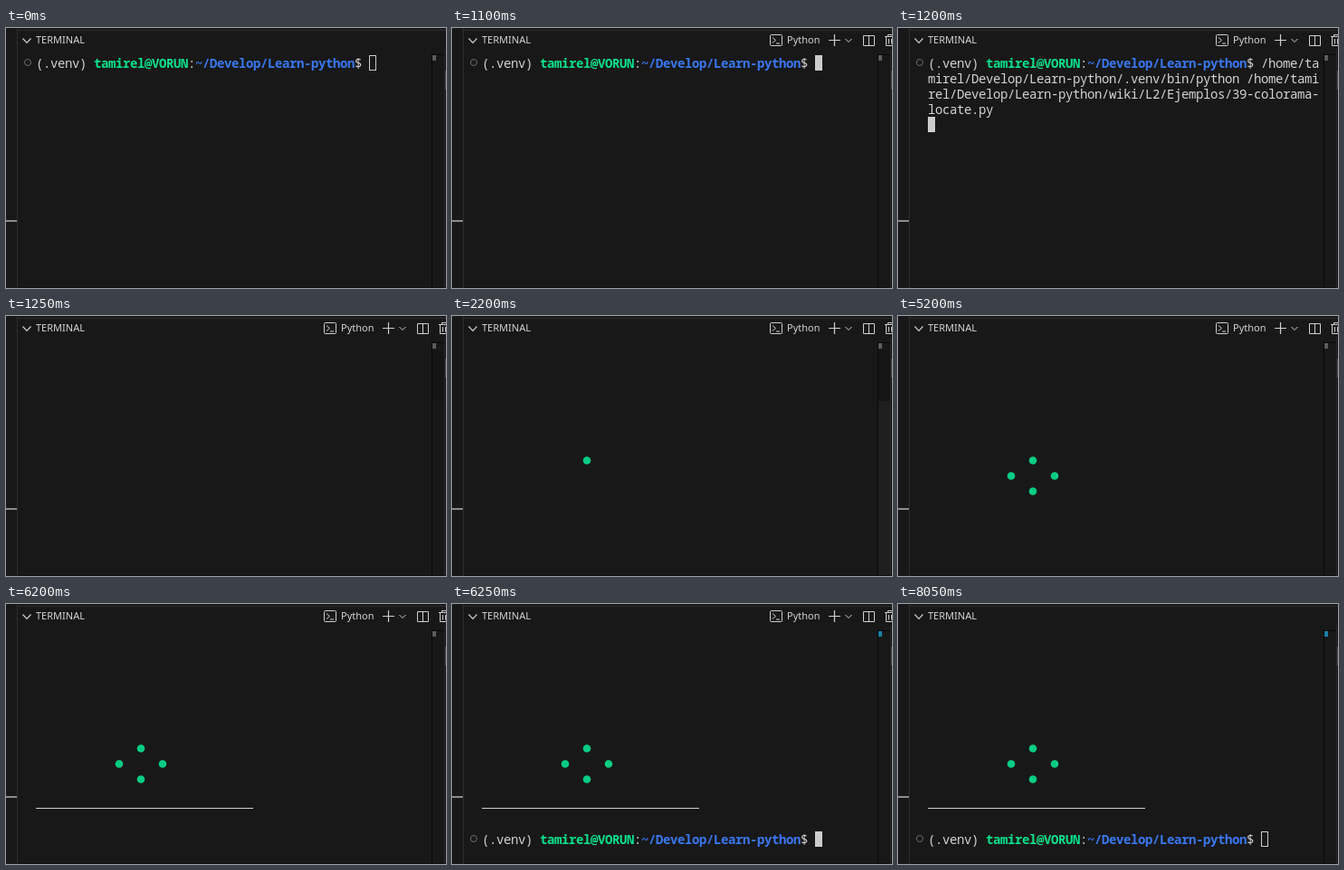
An HTML page for the animation above (8.25 s loop, 486 by 287 pixels).

```html
<!DOCTYPE html>
<html lang="en">
<head>
<meta charset="utf-8">
<title>Terminal</title>
<style>
  html, body { margin: 0; width: 100%; height: 100%; overflow: hidden; background: #181818; }
  .stage { position: relative; width: 486px; height: 287px; overflow: hidden; background: #181818; }
  svg { position: absolute; left: 0; top: 0; }
  .ui { font: 500 11px "Noto Sans", "Open Sans", sans-serif; fill: #d4d4d4; }
  .icon { fill: none; stroke: #cfcfcf; }

  .term {
    position: absolute; left: 33px; top: 30px; margin: 0; color: #d4d4d4;
    font: 14px/17px "Noto Sans Mono", "DejaVu Sans Mono", monospace;
    letter-spacing: calc(8px - 1ch); white-space: pre;
  }
  .term b { letter-spacing: inherit; font-weight: 700; }
  .user { color: #0ae08d; }
  .path { color: #3a78f0; }
  .ring {
    position: absolute; left: -13px; top: 4px; width: 8px; height: 8px;
    box-sizing: border-box; border: 1.6px solid #6c6c6c; border-radius: 50%;
  }
  .cursor { position: absolute; left: 368px; top: 0; width: 8px; height: 17px; box-sizing: border-box; }
  .block { background: #cccccc; }
  .hollow { border: 1px solid #cccccc; }

  .anim { animation: 8250ms step-end infinite; }
  .prompt { animation-name: prompt; }
  .hollow { animation-name: blurred; }
  .focus { animation-name: focused; }
  .command { animation-name: command; }
  .tools { animation-name: tools; }
  .slot { animation-name: slot; }
  .track { animation-name: track; }
  .mark { animation-name: mark; }
  .rule { animation-name: rule; }
  .d1 { animation-name: dot1; }
  .d2 { animation-name: dot2; }
  .d3 { animation-name: dot3; }
  .d4 { animation-name: dot4; }

  @keyframes prompt {
    0% { opacity: 1; transform: none; }
    15.151% { opacity: 0; transform: translateY(221px); }
    75.757% { opacity: 1; transform: translateY(221px); }
  }
  @keyframes blurred { 0% { opacity: 1; } 13.333% { opacity: 0; } 97.575% { opacity: 1; } }
  @keyframes focused {
    0% { opacity: 0; } 13.333% { opacity: 1; } 14.545% { opacity: 0; }
    75.757% { opacity: 1; } 97.575% { opacity: 0; }
  }
  @keyframes command { 0% { opacity: 0; } 14.545% { opacity: 1; } 15.151% { opacity: 0; } }
  @keyframes tools { 0% { opacity: 0; } 13.333% { opacity: 1; } 97.575% { opacity: 0; } }
  @keyframes slot { 0% { opacity: 0; } 15.151% { opacity: 1; } 38.787% { opacity: 0; } }
  @keyframes track { 0% { opacity: 0; } 15.757% { opacity: 1; } 38.787% { opacity: 0; } }
  @keyframes mark { 0% { fill: #5c5c5c; } 75.757% { fill: #1a80a8; } }
  @keyframes rule { 0% { opacity: 0; } 75.151% { opacity: 1; } }
  @keyframes dot1 { 0% { opacity: 0; } 26.666% { opacity: 1; } }
  @keyframes dot2 { 0% { opacity: 0; } 38.787% { opacity: 1; } }
  @keyframes dot3 { 0% { opacity: 0; } 50.909% { opacity: 1; } }
  @keyframes dot4 { 0% { opacity: 0; } 63.030% { opacity: 1; } }
</style>
</head>
<body>
<div class="stage">
  <svg width="486" height="287" viewBox="0 0 486 287">
    <!-- panel borders -->
    <path d="M12.5 0V287M12 2.5H486" stroke="#2d2d2d"/>
    <rect y="212" width="12" height="2" fill="#8c8c8c"/>
    <rect x="13" y="286" width="473" height="1" fill="#130d0f"/>

    <!-- scrollbar -->
    <rect class="anim slot" x="471" y="38" width="13" height="56" fill="#151515"/>
    <rect class="anim track" x="471" y="94" width="13" height="192" fill="#1f1f1f"/>
    <path d="M470.5 28V287M471 29.5H484" stroke="#080808"/>
    <path d="M484.5 24V287" stroke="#262626"/>
    <rect x="485" y="47" width="1" height="21" fill="#484848"/>
    <rect class="anim mark" x="471" y="30" width="4" height="6"/>

    <!-- header -->
    <path class="icon" d="M18.5 11.5L23 16.3L27.5 11.5" stroke-width="1.2"/>
    <text class="ui" x="33" y="17">TERMINAL</text>
    <g class="anim tools">
      <g class="icon">
        <rect x="351.5" y="7.5" width="13" height="12" rx="1"/>
        <path d="M354 10.5L357.5 13.5L354 16.5M358 17H362"/>
        <path d="M416 13.5H429M422.5 7V20" stroke-width="1.2"/>
        <path d="M434.5 12L438 15.5L441.5 12"/>
        <path d="M454.5 8.5H466.5V19.5H454.5ZM460.5 8V20"/>
        <path d="M478 9.5H489M481.5 9V7.5H486M479.5 10V19.5H488M482.5 12V17.5M485.5 12V17.5"/>
      </g>
      <text class="ui" x="370" y="17">Python</text>
    </g>

    <!-- program output -->
    <g fill="#06cd84">
      <circle class="anim d1" cx="149" cy="159.5" r="4.3"/>
      <circle class="anim d2" cx="125" cy="176.5" r="4.3"/>
      <circle class="anim d3" cx="173" cy="176.5" r="4.3"/>
      <circle class="anim d4" cx="149" cy="193.5" r="4.3"/>
    </g>
    <rect class="anim rule" x="33" y="225" width="240" height="1" fill="#d0d0d0"/>
  </svg>

  <div class="term anim prompt"><i class="ring"></i>(.venv) <b class="user">tamirel@VORUN</b>:<b class="path">~/Develop/Learn-python</b>$ <i class="cursor hollow anim"></i><i class="cursor block focus anim"></i></div>

  <div class="term anim command"><span style="padding-left:368px"></span>/home/ta
mirel/Develop/Learn-python/.venv/bin/python /home/tami
rel/Develop/Learn-python/wiki/L2/Ejemplos/39-colorama-
locate.py<i class="cursor block" style="left:0;top:68px"></i></div>
</div>
</body>
</html>
```
